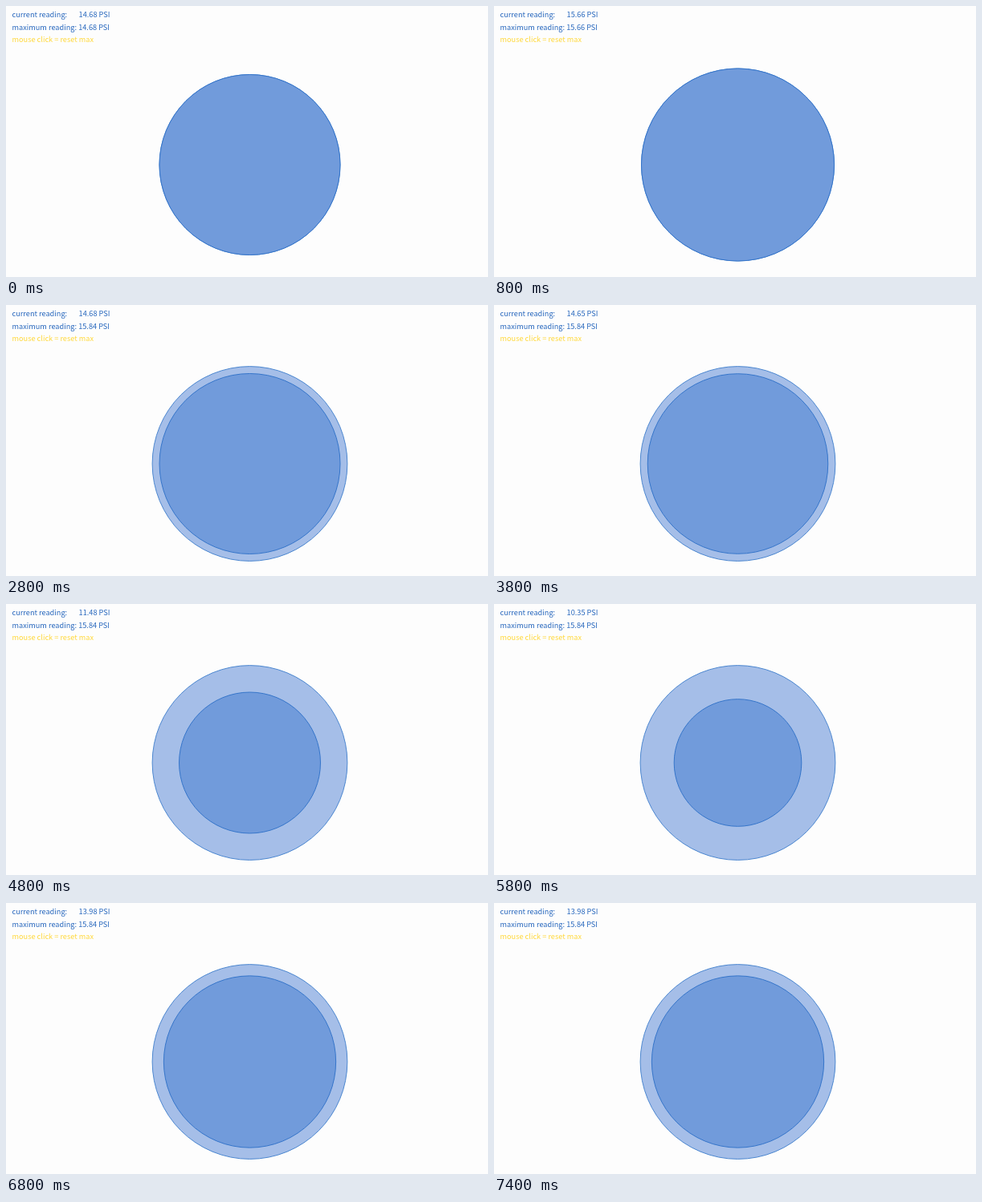
Write an HTML page that moves like this. It is 600 px wide and 338 px high and loops after 7.7 s.

```html
<!DOCTYPE html>
<html lang="en">
<head>
<meta charset="utf-8">
<title>Pressure gauge</title>
<style>
  html, body { margin: 0; width: 100%; height: 100%; overflow: hidden; background: #fdfdfd; }
  svg { display: block; width: 600px; height: 338px; }
  text {
    font: 9.2px "Noto Sans CJK SC", "Noto Sans CJK JP", "Noto Sans", sans-serif;
    fill: #2767bd;
    white-space: pre;
  }
  .hint { fill: #ffd83a; }
  circle { stroke-width: 1; }
  #maxDisc { fill: #a5bee8; stroke: #4c87d0; }
  #nowDisc { fill: #719bdb; stroke: #3575ca; }
</style>
</head>
<body>
<svg viewBox="0 0 600 338">
  <circle id="maxDisc" cx="303.5" cy="198"/>
  <circle id="nowDisc" cx="303.5" cy="198"/>
  <text id="nowText" x="7.5" y="14"></text>
  <text id="maxText" x="7.5" y="29.5"></text>
  <text class="hint" x="7.5" y="45">mouse click = reset max</text>
</svg>
<script>
  const LOOP = 7700;
  const PX_PER_PSI = 7.663;

  // [start in ms, pressure in PSI]: the sensor is sampled once a second
  const readings = [
    [0, 14.68], [800, 15.66], [1800, 15.84], [2800, 14.68],
    [3800, 14.65], [4800, 11.48], [5800, 10.35], [6800, 13.98]
  ];

  const byId = id => document.getElementById(id);
  const nowDisc = byId("nowDisc"), maxDisc = byId("maxDisc");
  const nowText = byId("nowText"), maxText = byId("maxText");
  const psi = value => value.toFixed(2) + " PSI";
  let shown = 0;

  function draw(time) {
    const past = readings.filter(([start]) => start <= time % LOOP);
    if (past.length === shown) return;
    shown = past.length;

    const values = past.map(([, value]) => value);
    const current = values[values.length - 1];
    const peak = Math.max(...values);
    nowDisc.setAttribute("r", current * PX_PER_PSI);
    maxDisc.setAttribute("r", peak * PX_PER_PSI);
    nowText.textContent = "current reading:" + " ".repeat(7) + psi(current);
    maxText.textContent = "maximum reading: " + psi(peak);
  }

  const begin = performance.now();
  function tick() {
    draw(performance.now() - begin);
    requestAnimationFrame(tick);
  }
  tick();
</script>
</body>
</html>
```
